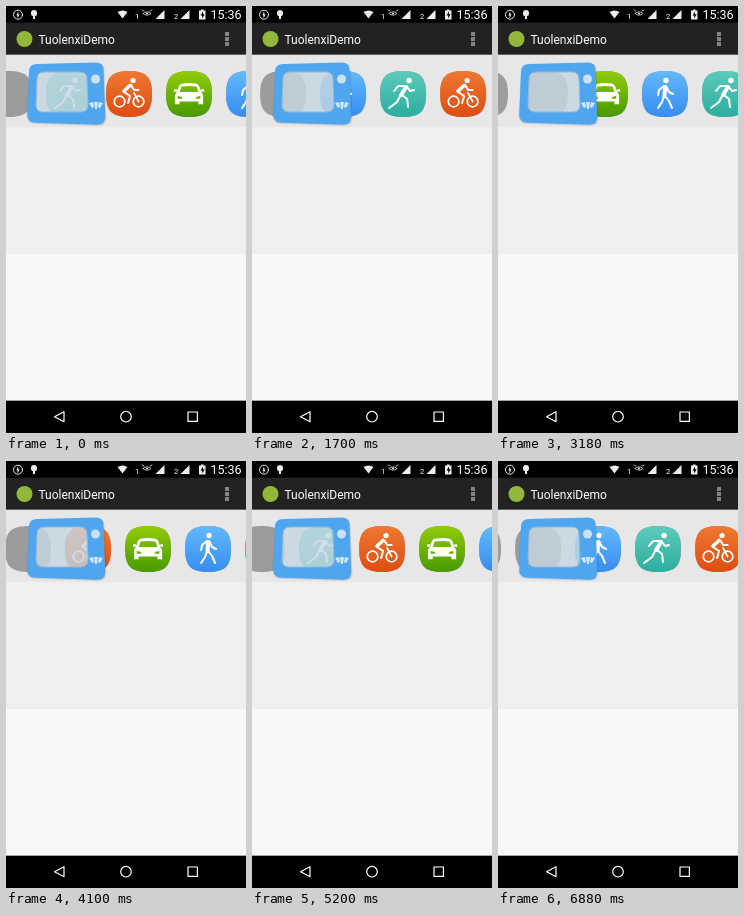
These frames come from a looping animation (240 by 427 pixels, 6900 ms). An HTML page:

```html
<!DOCTYPE html>
<html lang="en">
<head>
<meta charset="utf-8">
<title>Activity machine</title>
<style>
html, body { margin: 0; width: 100%; height: 100%; overflow: hidden; background: #000; }
svg { display: block; width: 100vw; height: 100vh; }
text { font-family: Roboto, "Noto Sans", sans-serif; fill: #fff; }
.draw { fill: none; stroke: #fff; stroke-linecap: round; stroke-linejoin: round; }
</style>
</head>
<body>
<svg viewBox="0 0 240 427" preserveAspectRatio="none">
  <defs>
    <path id="tile" d="M0-23C17-23 23-17 23 0S17 23 0 23-23 17-23 0-17-23 0-23Z"/>

    <g id="walk">
      <circle cx="1" cy="-13.500" r="2.700" fill="#fff"/>
      <path class="draw" stroke-width="4" d="M0-7L-.5 2"/>
      <path class="draw" stroke-width="2" d="M-1-8L-6-4-7 1M1-8L4-2 8 0M-1 2L-3 8-7 14M0 2L4 7 7 14"/>
    </g>
    <g id="run">
      <circle cx="6" cy="-13.500" r="2.700" fill="#fff"/>
      <path class="draw" stroke-width="4" d="M3-7L-2 1"/>
      <path class="draw" stroke-width="2" d="M2-8L-5-8-9-3M4-7L7-3 11-4M-3 2L-6 8-14 14M-1 1L4 5 5 13"/>
    </g>
    <g id="bike">
      <circle cx="4" cy="-13.500" r="2.600" fill="#fff"/>
      <g class="draw" stroke-width="1.700">
        <circle cx="-9.500" cy="7.500" r="5.300"/>
        <circle cx="9.500" cy="7.500" r="5.300"/>
        <path d="M5-1L9.500 7.500"/>
      </g>
      <path class="draw" stroke-width="3.600" d="M1-8.500L-5-3"/>
      <path class="draw" stroke-width="2" d="M2-9L5-4H9.500M-5-2L1 2-1 9"/>
    </g>
    <g id="car" transform="scale(.94)">
      <path fill="#fff" fill-rule="evenodd" d="M-8-11Q0-12.500 8-11 10-10.500 11-8L13-2 15 1V11H10V8H-10V11H-15V1L-13-2-11-8Q-10-10.500-8-11ZM-8-8L-10-2H10L8-8Q0-9-8-8ZM-12 2V5H-7L-8 3ZM12 2V5H7L8 3Z"/>
      <path fill="#fff" d="M-16-5h3v2.500h-3zM13-5h3v2.500h-3z"/>
    </g>
    <path id="signal" fill="#eee" d="M0 12L9 3V12Z"/>
  </defs>

  <rect width="240" height="427" fill="#f8f8f8"/>
  <rect y="48" width="240" height="200" fill="#efefef"/>
  <rect y="48" width="240" height="73" fill="#e7e7e7"/>

  <g id="belt"></g>

  <!-- machine -->
  <path fill="#000" opacity=".1" d="M31 59L91 57Q98 57 98.500 64L100.500 112Q100.500 120 92 120L29 118Q20.500 117.500 20.500 109L23 66Q24 59 31 59Z"/>
  <rect x="30" y="66" width="52" height="40" rx="7" fill="#cbdce8" opacity=".8"/>
  <path fill="#50a6ee" fill-rule="evenodd"
    d="M31 58L90 56.500Q97 56.500 97.500 63L99.300 111Q99.300 119 91 118.700L29 116.800Q21 116.500 21.300 108L23 65Q23.500 58 31 58ZM38 66Q31 66 31 73L30 99Q30 106 37 106H75Q82 106 82 99L81 73Q81 66 74 66Z"/>
  <path class="draw" style="stroke:#8fb9dc" stroke-width="1" d="M38 66H74Q81 66 81 73L82 99Q82 106 75 106H37Q30 106 30 99L31 73Q31 66 38 66Z"/>
  <circle cx="89.500" cy="73" r="4.500" fill="#cbe0f2"/>
  <path fill="#d3e6f5" d="M83 97l4-1 1 5-2 1zM88 96h4l-1 7h-2zM93 96l4 1-3 5-2-1z"/>

  <!-- status bar -->
  <rect width="240" height="18"/>
  <circle class="draw" cx="12" cy="8.700" r="4.500" stroke-width=".9"/>
  <path fill="#eee" d="M12 5.500l-1.500 4h1v3l2-4h-1zM25 7a3 3 0 0 1 6 0v1q0 1.500-1.500 2h-.5v3h-2v-3h-.5Q25 9.500 25 8zM111.500 6q5-3 10 0l-5 6.500z"/>
  <text x="129" y="13" font-size="7.500">1</text>
  <path class="draw" stroke-width=".7" d="M137 7.500q4-3.500 8 0-4 3.500-8 0M136 4l2 1M146 4l-2 1"/>
  <circle cx="141" cy="7.500" r="1" fill="#eee"/>
  <use href="#signal" x="149.500" y="1"/>
  <text x="168" y="13" font-size="7.500">2</text>
  <use href="#signal" x="174.500" y="1"/>
  <path fill="#eee" d="M195 3.500h2.500v1h2v9h-6.500v-9h2z"/>
  <path d="M197 5.500l-2.500 4h1.700v3l2.500-4.300H197z"/>
  <text x="204.500" y="13.300" font-size="12.500">15:36</text>

  <!-- title bar -->
  <rect y="16.670" width="240" height="32" fill="#222"/>
  <circle cx="18.500" cy="33" r="8" fill="#91b83c"/>
  <text x="32.500" y="37.500" font-size="12">TuolenxiDemo</text>
  <path fill="#858585" d="M219 26h4v4h-4zM219 31h4v4h-4zM219 36h4v4h-4z"/>

  <!-- navigation bar -->
  <rect y="394.670" width="240" height="33"/>
  <g class="draw" stroke-width="1.200" transform="translate(0 410.700)">
    <path d="M58-5V5L48.500 0Z"/>
    <circle cx="120" r="5.300"/>
    <path d="M182-4.700h9.400v9.400H182z"/>
  </g>
</svg>
<script>
const LOOP = 6900, GAP = 60, MACHINE_X = 60;
const kinds = [
  ["walk", "#62b9fa", "#378cf0"],
  ["run", "#5dcaba", "#2cae9f"],
  ["bike", "#ef7833", "#dd4d12"],
  ["car", "#93cb08", "#469a00"]
];
// Time in ms and progress in belt steps
const pace = [[0, .144], [760, .795], [1700, 1.511], [3180, 2.691], [4100, 3.414], [5200, 4.268], [6900, 5.624]];
const belt = document.getElementById("belt");
const items = [];

for (const [icon, top, bottom] of kinds) {
  belt.insertAdjacentHTML("beforebegin", `<linearGradient id="${icon}Fill" x2="0" y2="1">
    <stop stop-color="${top}"/><stop offset="1" stop-color="${bottom}"/></linearGradient>`);
}

function addItem(slot) {
  const [icon] = kinds[(slot + 8) % 4];
  belt.insertAdjacentHTML("beforeend", `<g>
    <use href="#tile" fill="#9c9c9c"/>
    <g><use href="#tile" fill="url(#${icon}Fill)"/><use href="#${icon}"/></g></g>`);
  const node = belt.lastElementChild;
  items.push({ slot, node, color: node.lastElementChild });
}
for (let slot = -7; slot <= 4; slot++) addItem(slot);

function travel(time) {
  const i = pace.findIndex(([end]) => end > time);
  const [t0, s0] = pace[i - 1], [t1, s1] = pace[i];
  const step = s0 + (s1 - s0) * (time - t0) / (t1 - t0);
  const whole = Math.floor(step);
  return GAP * (whole + (1 - Math.cos(Math.PI * (step - whole))) / 2);
}

function draw() {
  const shift = travel(performance.now() % LOOP);
  for (const { slot, node, color } of items) {
    const x = shift + GAP * slot;
    node.setAttribute("transform", `translate(${x.toFixed(2)} 88)`);
    color.style.display = x < MACHINE_X ? "none" : "";
  }
  requestAnimationFrame(draw);
}
draw();
</script>
</body>
</html>
```
